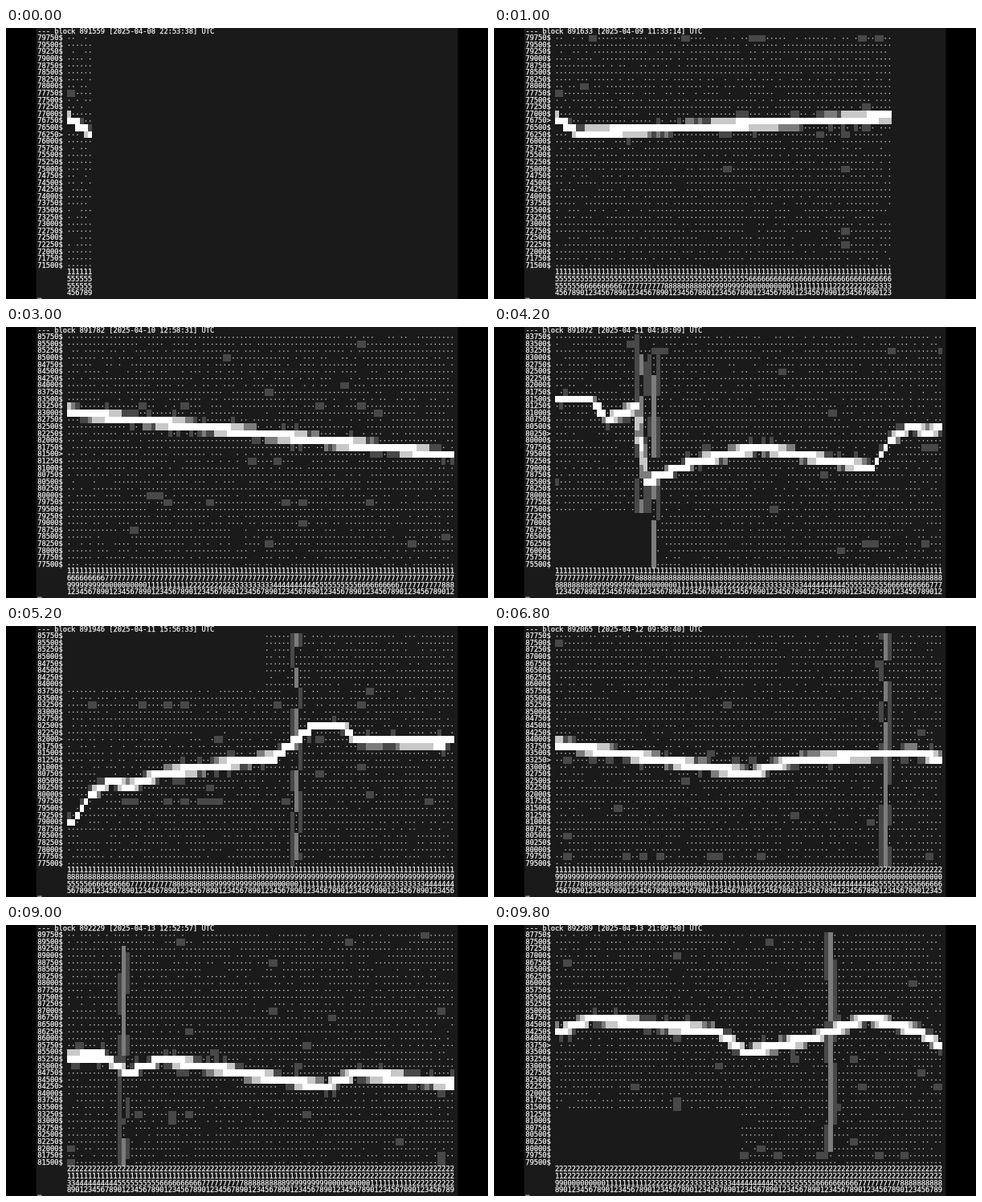
Recreate the animation shown at these times as an HTML page with a canvas. Size 600 px wide and 338 px high, loop 10000 ms.

```html
<!DOCTYPE html>
<html lang="en">
<head>
<meta charset="utf-8">
<title>Block price heatmap</title>
<style>
  html, body { margin: 0; width: 100%; height: 100%; overflow: hidden; background: #000; }
  canvas { display: block; }
</style>
</head>
<body>
<canvas id="stage" width="600" height="338"></canvas>
<script>
const ctx = document.getElementById('stage').getContext('2d');
const STEP_MS = 200, STEPS = 50, BLOCKS_PER_STEP = 14.89;
const CHAR_W = 5.24, ROW_H = 8.59, LEFT = 39.2, PLOT_X = LEFT + 7 * CHAR_W;
const ROWS = 34, COLUMNS = 92, BUCKET = 250;
const FIRST_BLOCK = 891554, START = 5, END = 735;
const SHADES = ['#d8d8d8', '#484848', '#7c7c7c', '#c8c8c8', '#ffffff'];

// Known block times; those between are interpolated
const clock = [
  [5, '2025-04-08T22:53:38Z'], [139, '2025-04-09T21:49:08Z'], [318, '2025-04-11T04:18:09Z'],
  [392, '2025-04-11T15:56:33Z'], [511, '2025-04-12T09:58:40Z'], [615, '2025-04-13T04:36:04Z'],
  [END, '2025-04-13T21:09:50Z']
].map(([i, time]) => [i, Date.parse(time)]);

// Turning points of the price, in buckets, by block index
const turns = [
  [0, 307.4], [5, 305.2], [90, 308], [95, 310], [110, 311], [112, 325], [118, 330],
  [123, 327], [131, 328], [134, 333], [139, 332], [226, 326], [235, 326], [239, 323],
  [246, 325], [248, 314], [260, 317], [275, 319], [302, 316], [306, 320], [311, 322],
  [315, 321.2], [323, 323], [350, 325.5], [359, 330], [366, 330], [369, 328],
  [390, 327.5], [420, 335.4], [466, 331], [476, 333], [505, 334.2], [511, 333.2],
  [533, 334.5], [543, 340], [551, 337.6], [568, 341.3], [592, 341.5], [598, 339],
  [606, 341], [645, 337], [652, 339], [682, 337], [689, 334], [704, 336], [718, 339],
  [730, 337], [END, 335]
];
const WALLS = [305, 319, 333];                       // prices with steady extra volume
const bursts = [113, 247, 250, 355, 498, 570, 597, 709];  // blocks with volume at all prices

const hash = (a, b) => {
  const n = Math.sin(a * 127.1 + b * 311.7) * 43758.5453;
  return n - Math.floor(n);
};

function interpolate(points, x) {
  const i = Math.max(1, points.findIndex(p => p[0] >= x));
  const [x0, y0] = points[i - 1], [x1, y1] = points[i];
  return y0 + (y1 - y0) * (x - x0) / (x1 - x0);
}

const priceAt = i => interpolate(turns, Math.min(END, Math.max(0, i)));

// The visible range jumps by eight buckets when the price nears an edge
const tops = [319];
for (let i = 1; i <= END; i++) {
  const room = tops[i - 1] - priceAt(i - 3);
  tops[i] = tops[i - 1] + (room < 10 ? 8 : room > 23 ? -8 : 0);
}

// -1 is blank, 0 a dot, 1 to 4 ever brighter blocks
function shadeAt(i, k) {
  const price = priceAt(i), distance = Math.abs(k - price), noise = hash(i, k);
  if (distance <= 0.55) return 4;
  if (distance < 0.75) return 3;
  const nearby = [priceAt(i - 1), price, priceAt(i + 1)];
  if (k > Math.min(...nearby) && k < Math.max(...nearby)) return noise < 0.4 ? 3 : 2;
  if (distance < 0.95) return noise < 0.5 ? 2 : 1;
  if (distance < 1.6 && noise < 0.14) return 1;

  const burst = bursts.find(b => Math.abs(b - i) <= 1);
  if (burst && distance < 18 && hash(i, Math.floor(k / 3)) < 0.65) return i === burst ? 2 : 1;
  if (hash((i >> 1) + 900, k) < (WALLS.includes(k) ? 0.12 : 0.008)) return 1;

  const density = 0.55 + 0.55 * hash(k, Math.floor(i / 11));
  return noise < density ? 0 : -1;
}

function text(string, x, row) {
  for (let i = 0; i < string.length; i++) {
    const at = [string[i], x + i * CHAR_W, (row + 0.52) * ROW_H];
    ctx.fillText(...at);
    ctx.strokeText(...at);
  }
}

function drawCell(column, row, shade) {
  const x = PLOT_X + column * CHAR_W, y = row * ROW_H;
  ctx.fillStyle = SHADES[shade];
  if (shade === 0) {
    ctx.fillRect(x + CHAR_W / 2 - 0.65, y + ROW_H / 2 - 0.65, 1.3, 1.3);
  } else {
    const left = Math.round(x), top = Math.round(y);
    ctx.fillRect(left, top, Math.round(x + CHAR_W) - left, Math.round(y + ROW_H) - top);
  }
}

function draw(step) {
  const last = START + Math.round(step * BLOCKS_PER_STEP);
  const first = Math.max(0, last - COLUMNS + 1);
  const stamp = new Date(interpolate(clock, last)).toISOString().slice(0, 19).replace('T', ' ');
  const top = tops[last], current = Math.floor(priceAt(last));

  ctx.fillStyle = '#000';
  ctx.fillRect(0, 0, 600, 338);
  ctx.fillStyle = '#1a1a1a';
  ctx.fillRect(37.5, 0, 525, 338);

  for (let i = first; i <= last; i++) {
    for (let row = 1; row <= ROWS; row++) {
      const k = top - row + 1;
      if (k > tops[i] || k <= tops[i] - ROWS) continue;
      const shade = shadeAt(i, k);
      if (shade >= 0) drawCell(i - first, row, shade);
    }
  }

  ctx.fillStyle = ctx.strokeStyle = '#f2f2f2';
  ctx.lineWidth = 0.25;
  ctx.font = '8.7px "DejaVu Sans Mono", monospace';
  ctx.textBaseline = 'middle';
  text(`--- block ${FIRST_BLOCK + last} [${stamp}] UTC`, LEFT, 0);
  for (let row = 1; row <= ROWS; row++) {
    const k = top - row + 1;
    text(k * BUCKET + (k === current ? '>' : '$'), LEFT, row);
  }
  for (let digit = 0; digit < 4; digit++) {
    let line = '';
    for (let i = first; i <= last; i++) line += String(FIRST_BLOCK + i)[digit + 2];
    text(line, PLOT_X, ROWS + 1 + digit);
  }
  ctx.fillStyle = '#999';
  ctx.fillRect(LEFT, 336.5, CHAR_W, 1.5);
}

let shown = -1;
function tick() {
  const step = Math.floor(performance.now() / STEP_MS) % STEPS;
  if (step !== shown) draw(shown = step);
  requestAnimationFrame(tick);
}
tick();
</script>
</body>
</html>
```
